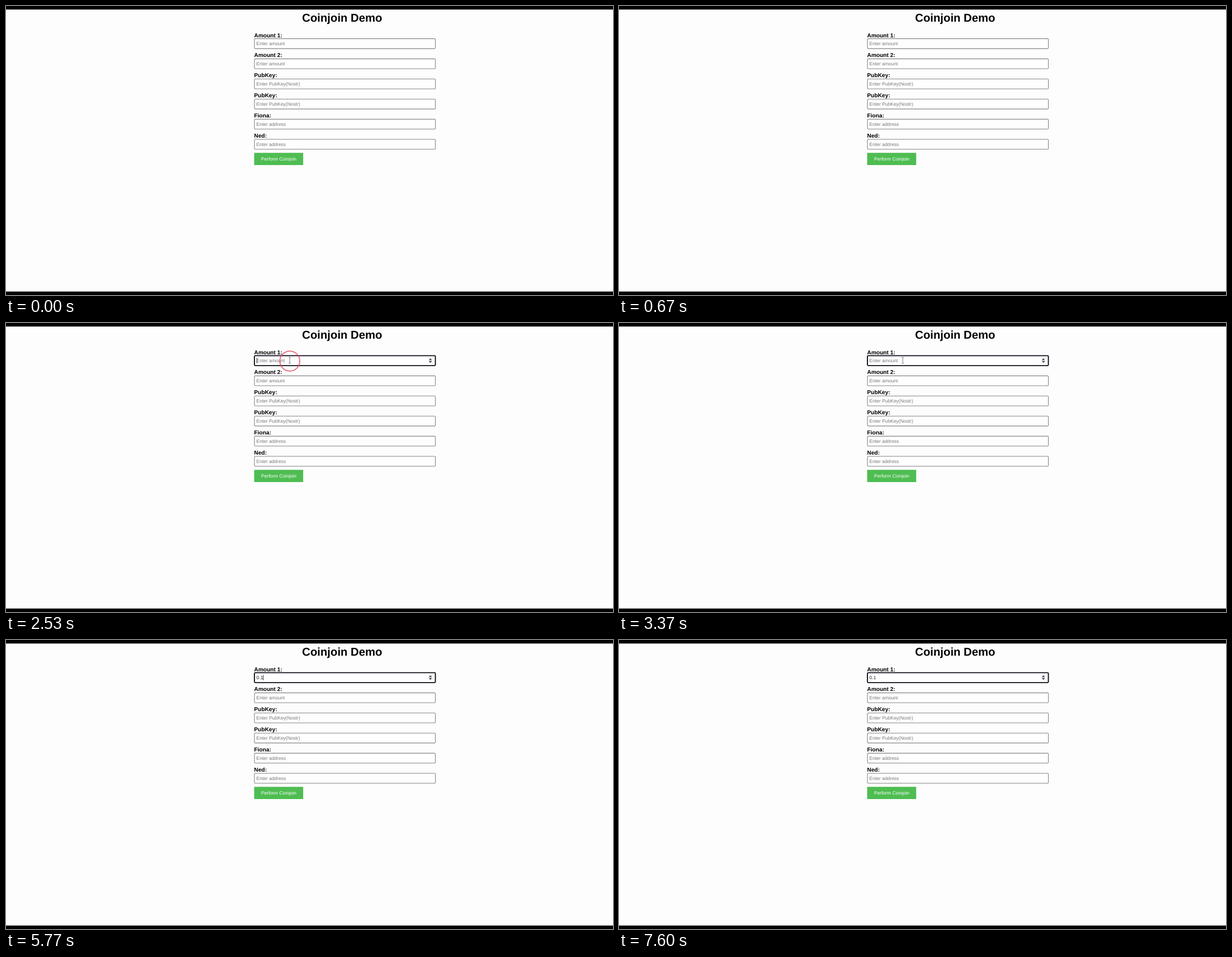
An HTML page for the animation above (8000 ms loop, 1085 px wide and 516 px high).

```html
<!DOCTYPE html>
<html lang="en">
<head>
<meta charset="utf-8">
<title>Coinjoin Demo</title>
<style>
  html, body { margin: 0; width: 100%; height: 100%; overflow: hidden; background: #fdfdfd; }
  svg { display: block; font: 8.47px "Liberation Sans", Arial, sans-serif; text-rendering: geometricPrecision; }
  .title { font-size: 20.3px; font-weight: bold; }
  .label { font-size: 10.17px; font-weight: bold; }
  .hint { fill: #777; }
  .box { fill: #fefefe; stroke: #858389; stroke-width: 1.1; }
  .box.focus { stroke: #100c18; stroke-width: 1.9; }
</style>
</head>
<body>
<svg width="1085" height="516" viewBox="0 0 1085 516">
  <rect width="1085" height="516" fill="#fdfdfd"/>
  <rect width="1085" height="6.3"/>
  <rect y="509.8" width="1085" height="6.2"/>
  <text class="title" x="529.3" y="27.8">Coinjoin Demo</text>
  <g id="form"></g>
  <rect x="443.6" y="262.2" width="87.6" height="21.8" fill="#4fbd52"/>
  <text x="456" y="276.1" fill="#fff">Perform Coinjoin</text>
  <rect id="caret" y="62.3" width="0.9" height="9.6" fill="#111"/>
  <circle id="ring" cx="507.3" cy="68" fill="none" stroke="#e4455c" stroke-width="2"/>
  <path id="arrow" d="M0 0V9.6L2.3 7.6L3.9 11L5.5 10.3L4 7H7Z" fill="#111" stroke="#fff" stroke-width=".5"/>
  <path id="beam" d="M-2-5.5Q0-5.5 0-4.5Q0-5.5 2-5.5M0-4.5V4.5M-2 5.5Q0 5.5 0 4.5Q0 5.5 2 5.5" fill="none" stroke="#666" stroke-width=".9"/>
</svg>
<script>
const $ = id => document.getElementById(id);
const LOOP = 8000, TOP = 58, STEP = 35.93;
const CLICK = 2370, RING_END = 2700, HIDE = 4500;

const fields = [
  ["Amount 1:", "Enter amount"],
  ["Amount 2:", "Enter amount"],
  ["PubKey:", "Enter PubKey(Nostr)"],
  ["PubKey:", "Enter PubKey(Nostr)"],
  ["Fiona:", "Enter address"],
  ["Ned:", "Enter address"]
];

$("form").innerHTML = fields.map(([label, hint], i) => `
  <g transform="translate(0 ${i * STEP})">
    <text class="label" x="443.6" y="55.5">${label}</text>
    <rect class="box" x="444.1" y="58.4" width="323.4" height="17.7" rx="1.5"/>
    <text class="hint" x="447.6" y="70.1">${hint}</text>
    <g class="spin"><rect x="755" y="62" width="7.4" height="10" fill="#ececf0"/>
      <path d="M756 66.2L758.6 63.3L761.2 66.2ZM756 68L758.6 70.9L761.2 68Z" fill="#3c3745"/></g>
  </g>`).join("");

const boxes = document.querySelectorAll(".box");
const spins = document.querySelectorAll(".spin");
const value = document.querySelector(".hint");

// Pointer stops: time, x, y
const path = [[1070, 283, 385], [1500, 473, 111], [2060, 507.2, 66.7]];
// Keystrokes: time, field content, caret x
const typing = [[0, "", 448], [5130, "0", 452.6], [5530, "0.", 455], [5770, "0.1", 459.4]];
const caretSpans = [[CLICK, 3140], [3670, 4200], [4730, 6330], [6860, 7500]];

const show = (el, on) => el.setAttribute("visibility", on ? "visible" : "hidden");

function pointerAt(t) {
  const end = path[path.length - 1];
  if (t >= end[0]) return end.slice(1);
  const i = t < path[1][0] ? 0 : 1;
  const [t0, x0, y0] = path[i], [t1, x1, y1] = path[i + 1];
  const p = Math.max(0, (t - t0) / (t1 - t0));
  const e = 1 - (1 - p) ** 2;
  return [x0 + (x1 - x0) * e, y0 + (y1 - y0) * e];
}

function draw(t) {
  const [x, y] = pointerAt(t);
  const visible = t >= path[0][0] && t < HIDE;
  const hovered = fields.findIndex((_, i) => {
    const top = TOP + i * STEP;
    return visible && x > 444 && x < 768 && y > top && y < top + 17;
  });
  const focused = t >= CLICK;

  boxes[0].classList.toggle("focus", focused);
  spins.forEach((s, i) => show(s, i < 2 && (i === hovered || (i === 0 && focused))));

  for (const [id, on] of [["arrow", hovered < 0], ["beam", hovered >= 0]]) {
    $(id).setAttribute("transform", `translate(${x} ${y})`);
    show($(id), visible && on);
  }

  const p = (t - CLICK) / (RING_END - CLICK);
  show($("ring"), p >= 0 && p < 1);
  if (p >= 0 && p < 1) {
    $("ring").setAttribute("r", 6 + 16 * (1 - (1 - p) ** 2));
    $("ring").setAttribute("opacity", 0.75 * Math.min(1, 2 * (1 - p)));
  }

  const [, text, caretX] = typing.filter(k => k[0] <= t).pop();
  value.textContent = text || fields[0][1];
  value.style.fill = text ? "#222" : "";
  $("caret").setAttribute("x", caretX);
  show($("caret"), caretSpans.some(([a, b]) => t >= a && t < b));
}

const start = performance.now();
function tick() {
  draw((performance.now() - start) % LOOP);
  requestAnimationFrame(tick);
}
tick();
</script>
</body>
</html>
```
